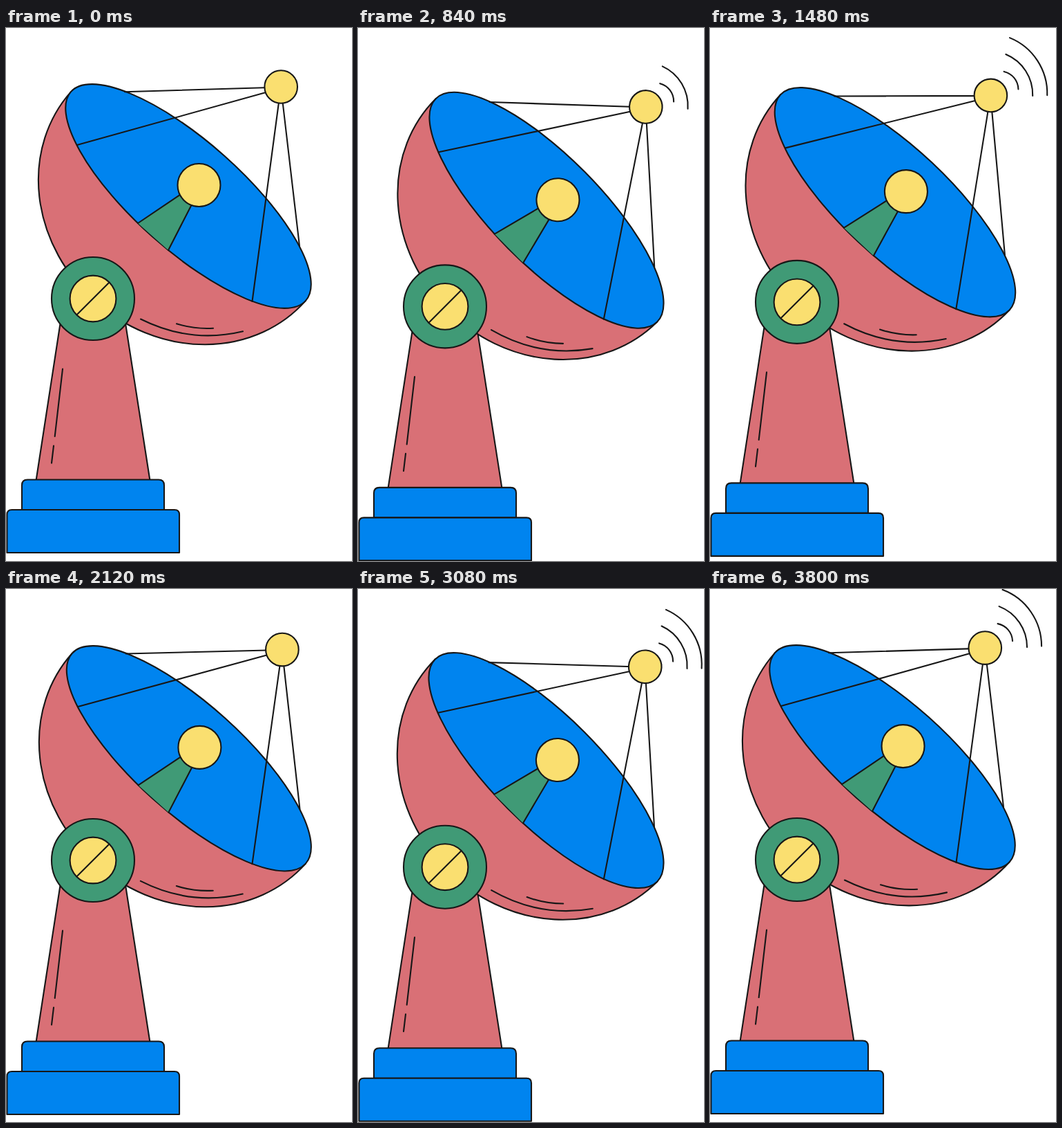
An HTML page that plays this animation: 501x770 px, repeating every 3840 ms.

```html
<!DOCTYPE html>
<html lang="en">
<head>
<meta charset="utf-8">
<title>Satellite dish</title>
<style>
  html, body { margin: 0; width: 100%; height: 100%; overflow: hidden; background: #fff; }
  svg { display: block; stroke: #171717; stroke-width: 2.1; stroke-linecap: round; stroke-linejoin: round; }
  .red { fill: #d97076; }
  .blue { fill: #0084ef; }
  .green { fill: #409a76; }
  .yellow { fill: #fadf70; }
  .line { fill: none; }
</style>
</head>
<body>
<svg width="501" height="770" viewBox="0 0 501 770">
  <g id="rig">
    <path class="red" d="M83 398L43.5 654H208.5L168.5 398Z"/>
    <path class="line" d="M82 492.5L70.7 590M69 603.5L66 628.5"/>
    <path class="blue" d="M23 696V660.500Q23 652.500 31 652.500H221Q229 652.500 229 660.500V696Z"/>
    <path class="blue" d="M1.500 758V703Q1.500 696 8.500 696H244Q251 696 251 703V758Z"/>

    <g id="dish">
      <g transform="translate(264 243) rotate(41.6)">
        <path class="red" d="M-227.3 0A227.3 203.4 0 0 0 227.3 0"/>
        <ellipse class="blue" rx="227.3" ry="78.3"/>
      </g>
      <path class="line" d="M195 420.500Q267 456.500 343 438.300M247 427.300Q273 435.300 300 433.700"/>
      <path class="green" d="M191 282L289 216L235 321"/>
      <circle class="yellow" cx="279.5" cy="227" r="31"/>
      <path class="line" d="M172 92.200L398 85.500M103 169L398 87M356.500 395L398 85M425 315L398 85"/>
      <circle class="yellow" cx="398.2" cy="85" r="23.8"/>
      <g id="waves" class="line" transform="translate(398 85)">
        <path d="M18.500 -35A26.600 26.600 0 0 1 40 -10"/>
        <path d="M20.500 -60A63 63 0 0 1 61 -1"/>
        <path d="M25.500 -84A86.800 86.800 0 0 1 82 -2.500"/>
      </g>
    </g>

    <circle class="green" cx="126" cy="391" r="60"/>
    <circle class="yellow" cx="126" cy="391" r="33.4"/>
    <path class="line" d="M102.500 414.300L149.500 367.500"/>
  </g>
</svg>
<script>
  const CYCLE = 1920, DROP = 11.7, TILT = 3.7;
  const WAVE_STARTS = [480, 780, 1080];
  const rig = document.getElementById('rig');
  const dish = document.getElementById('dish');
  const waves = [...document.getElementById('waves').children];

  const easeInOut = x => x < 0.5 ? 2 * x * x : 1 - 2 * (1 - x) ** 2;

  function draw(now) {
    const t = now % CYCLE;
    const p = easeInOut(1 - Math.abs(1 - 2 * t / CYCLE));
    rig.setAttribute('transform', `translate(0 ${DROP * p})`);
    dish.setAttribute('transform', `rotate(${TILT * p} 126 391)`);
    waves.forEach((wave, i) => {
      wave.style.display = t >= WAVE_STARTS[i] ? '' : 'none';
    });
  }

  let start;
  function tick(now) {
    start ??= now;
    draw(now - start);
    requestAnimationFrame(tick);
  }
  draw(0);
  requestAnimationFrame(tick);
</script>
</body>
</html>
```
